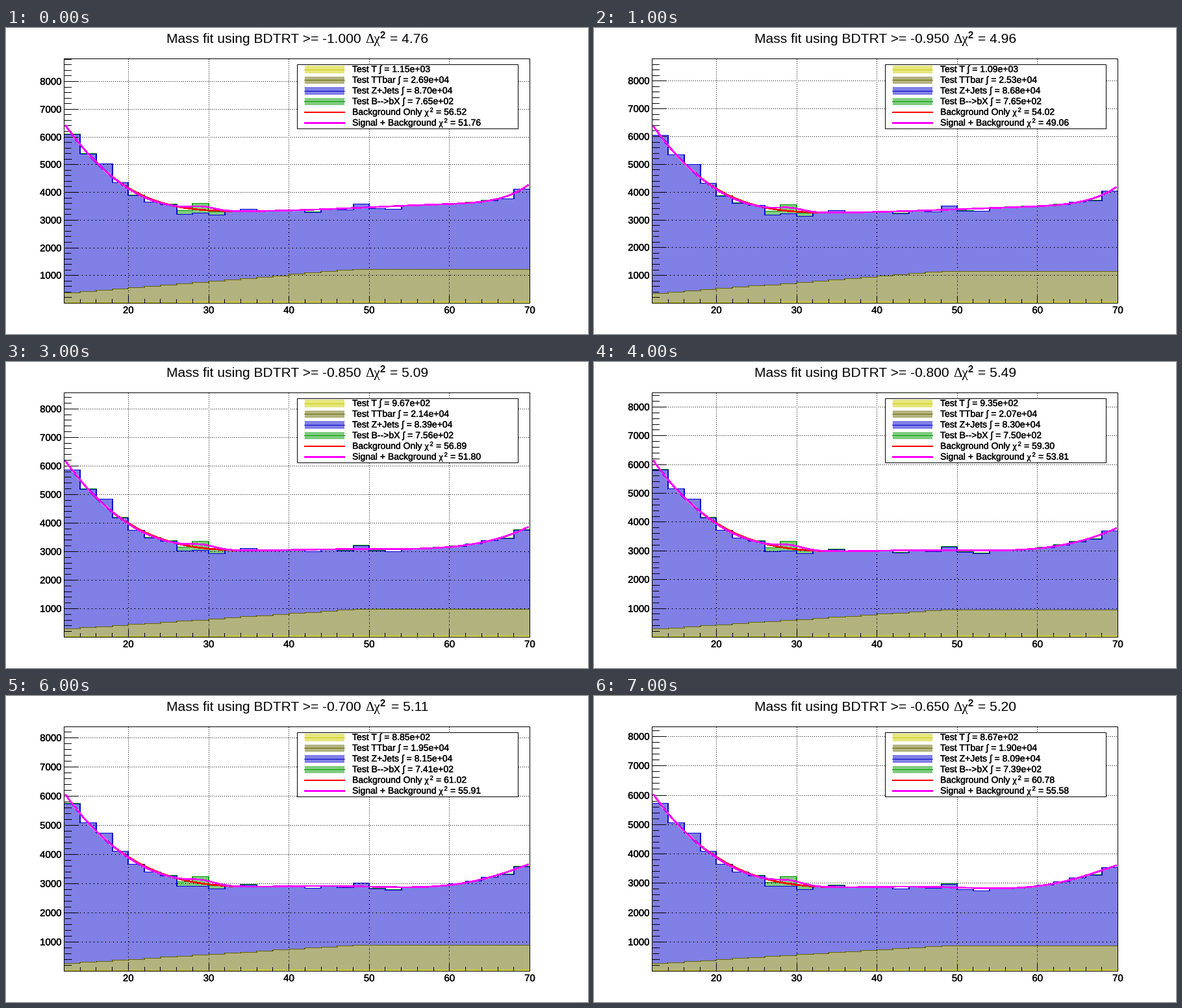
Recreate the animation shown at these times as a matplotlib script. Size 896x472 px, loop 8000 ms.

```python
import numpy as np
import matplotlib.pyplot as plt
from matplotlib.animation import FuncAnimation
from matplotlib.patches import Rectangle
from matplotlib.patheffects import withStroke

W, H, DPI = 896, 472, 64
LEFT, RIGHT, TOP, BOTTOM = 89.5, 806.5, 47.5, 424.5
PX = 72 / DPI  # points per pixel

plt.rcParams["font.family"] = ["Liberation Sans", "DejaVu Sans"]
plt.rcParams["path.snap"] = False

T_COLOR, TT_COLOR = (204, 204, 0), (102, 102, 0)
Z_COLOR, B_COLOR = (0, 0, 204), (0, 153, 0)

# Printed readings per cut: T, TTbar, Z+Jets, signal, chi2 of both fits
STEPS = [
    (1150, 26900, 87000, 765, 56.52, 51.76),
    (1090, 25300, 86800, 765, 54.02, 49.06),
    (1030, 23500, 85400, 763, 55.08, 48.89),
    (967, 21400, 83900, 756, 56.89, 51.80),
    (935, 20700, 83000, 750, 59.30, 53.81),
    (904, 20100, 82200, 744, 61.35, 55.35),
    (885, 19500, 81500, 741, 61.02, 55.91),
    (867, 19000, 80900, 739, 60.78, 55.58),
]

# Key points of the background fit at the loosest and the tightest cut
FIT_X = [12.2, 15, 19, 24, 30, 38, 50, 62, 69.75]
FIT_LOOSE = [6400, 5390, 4345, 3640, 3350, 3335, 3460, 3610, 4257]
FIT_TIGHT = [6011, 5065, 4070, 3350, 2940, 2868, 2851, 2985, 3602]

# Bins that stray visibly from the fit
STRAYS = {17: 220, 21: -100, 23: -95, 27: -235, 29: -110, 31: -150, 35: 70,
          43: -90, 47: -60, 49: 130, 51: -70, 53: -110, 67: -85}

EDGES = np.arange(12, 71, 2)
CENTRES = EDGES[:-1] + 1
STRAY = np.array([STRAYS.get(c, 0) for c in CENTRES])
MASS = np.linspace(12.2, 69.75, 101)

YY, XX = np.mgrid[:H, :W]
BIN = np.clip(((XX[0] + 0.5 - LEFT) * 29 / (RIGHT - LEFT)).astype(int), 0, 28)
INSIDE = (XX > LEFT) & (XX < RIGHT) & (YY < BOTTOM)
EVEN = (XX + YY) % 2 == 0


def x_px(mass):
    return LEFT + (np.asarray(mass) - 12) * (RIGHT - LEFT) / 58


def pixel_centre(v):
    return np.floor(v) + 0.5


def bump(x, centre, width):
    return np.exp(-((x - centre) / width) ** 2)


def scaled(x):
    return (np.asarray(x) - 41) / 29


def progress(i):
    """How far the background has shrunk, from 0 to 1."""
    totals = [sum(step[:3]) for step in STEPS]
    return (totals[0] - totals[i]) / (totals[0] - totals[-1])


def blank():
    return np.full((H, W, 3), 255, np.uint8)


def fill(img, region, color, pattern=EVEN):
    img[region] = 255
    img[region & pattern] = color


def stairs(heights):
    """Outline of a histogram in pixels, closed down to the axis."""
    y = np.repeat(pixel_centre(heights), 2)
    return np.repeat(x_px(EDGES), 2), np.concatenate([[BOTTOM], y, [BOTTOM]])


fig = plt.figure(figsize=(W / DPI, H / DPI), dpi=DPI, facecolor="white")
ax = fig.add_axes([0, 0, 1, 1])
ax.axis("off")


def show(img, z):
    return ax.imshow(img, extent=(0, W, H, 0), interpolation="nearest",
                     aspect="auto", zorder=z)


def line(color, width=1, z=3, x=(), y=()):
    if not isinstance(color, str):
        color = np.array(color) / 255
    return ax.plot(x, y, color=color, lw=width * PX, zorder=z,
                   antialiased=False)[0]


def segments(z, **style):
    return ax.vlines([], 0, 1, colors="black", lw=PX, zorder=z, **style)


def text(x, y, s, size, ha="left", **style):
    heavy = [withStroke(linewidth=0.35 * PX, foreground="black")]
    return ax.text(x, y, s, fontsize=size * PX, ha=ha, va="baseline", zorder=9,
                   path_effects=heavy if size < 16 else None, **style)


def symbol(x, y, s, size):
    text(x, y, s, size, family="Liberation Serif")


def box(x0, y0, x1, y1, z, face="none"):
    ax.add_patch(Rectangle((x0, y0), x1 - x0, y1 - y0, fc=face, ec="black",
                           lw=PX, zorder=z))


picture = show(blank(), 1)
grid = segments(2, linestyles=(0, (1, 2)))
ticks = segments(5)
signal_line = line(B_COLOR)
back_line = line(Z_COLOR, z=4)
ttbar_line = line(TT_COLOR, z=4)
t_line = line(T_COLOR, z=4)
red_fit = line("red", 1.7, 6)
magenta_fit = line("magenta", 1.7, 6.5)
box(LEFT, TOP, RIGHT, BOTTOM, 6)

# Legend
box(448.5, 56.5, 788.5, 155.5, 7, "white")
rows = [63.5 + 16.5 * k for k in range(6)]
names = ("Test T", "Test TTbar", "Test Z+Jets", "Test B-->bX")
swatches = np.zeros((H, W, 4), np.uint8)
entries = []
for row, color in zip(rows, (T_COLOR, TT_COLOR, Z_COLOR, B_COLOR)):
    area = (XX >= 460) & (XX < 521) & (abs(YY - row) <= 5.5)
    pattern = ~EVEN if color == Z_COLOR else EVEN
    fill(swatches, area, (*color, 255), pattern)
    line(color, 1, 8.5, (460, 521), (pixel_centre(row + 0.5),) * 2)
    entries.append(text(533, row + 4.5, "", 14))
show(swatches, 8)

chi_values = []
for row, color, label, x in ((rows[4], "red", "Background Only", 644.5),
                             (rows[5], "magenta", "Signal + Background", 666.5)):
    line(color, 2, 8.5, (460, 521), (row + 0.5,) * 2)
    text(533, row + 4.5, label, 14)
    symbol(x, row + 4.5, "χ", 14)
    text(x + 8, row, "2", 9.5)
    chi_values.append(text(x + 17.5, row + 4.5, "", 14))

title = text(247, 23, "", 21)
symbol(553, 23, "Δχ", 21)
text(576, 15.5, "2", 14.5)
title_value = text(650, 23, "", 21, "right")

for m in range(20, 71, 10):
    text(x_px(m), 440, str(m), 15, "center")
y_labels = [text(86, 0, str(1000 * k), 15, "right") for k in range(1, 9)]

ax.set_xlim(0, W)
ax.set_ylim(H, 0)


def draw_axes(y_px, y_max):
    majors = pixel_centre(y_px(np.arange(1000, 8001, 1000)))
    verticals = pixel_centre(x_px(np.arange(20, 61, 10)))
    grid.set_segments([[(LEFT + 0.5, y), (RIGHT, y)] for y in majors]
                      + [[(x, TOP + 0.5), (x, BOTTOM)] for x in verticals])
    marks = []
    for v in range(200, int(y_max) + 1, 200):
        y = pixel_centre(y_px(v))
        marks.append([(LEFT, y), (LEFT + (11.5 if v % 1000 else 22.5), y)])
    for m in EDGES[1:-1]:
        x = pixel_centre(x_px(m))
        marks.append([(x, BOTTOM), (x, BOTTOM - (6.5 if m % 10 else 11.5))])
    ticks.set_segments(marks)
    for label, y in zip(y_labels, majors):
        label.set_y(y + 5)


def update(i):
    t, tt, z, sig, chi_b, chi_s = STEPS[i]
    scale = 42.75 + 2.5 * (87000 - z) / 6100  # pixels per 1000 entries

    def y_px(v):
        return BOTTOM - np.asarray(v) * scale / 1000

    draw_axes(y_px, (BOTTOM - TOP) / scale * 1000)

    # Fits
    p = progress(i)
    points = (1 - p) * np.array(FIT_LOOSE) + p * np.array(FIT_TIGHT)
    poly = np.polyfit(scaled(FIT_X), points, 7)
    fit = np.polyval(poly, scaled(MASS))
    both = fit + 125 * bump(MASS, 29.2, 2.2) - 35 * bump(MASS, 22, 3)
    red_fit.set_data(x_px(MASS), y_px(fit))
    magenta_fit.set_data(x_px(MASS), y_px(both))

    # Stacked histograms
    back = np.polyval(poly, scaled(CENTRES)) + STRAY * (1 - 0.15 * p)
    signal = back + sig / 765 * (330 * bump(CENTRES, 28.9, 2) + 12)
    ttbar = np.minimum(370 + 24 * (CENTRES - 13), 1225) * (t + tt) / 28050
    top = np.minimum(20 + 1.1 * (CENTRES - 13), 50) * t / 1150
    img = blank()
    for values, outline, color, pattern in (
            (signal, signal_line, B_COLOR, EVEN), (back, back_line, Z_COLOR, ~EVEN),
            (ttbar, ttbar_line, TT_COLOR, EVEN), (top, t_line, T_COLOR, EVEN)):
        y = y_px(values)
        fill(img, INSIDE & (YY >= y[BIN]), color, pattern)
        outline.set_data(*stairs(y))
    picture.set_data(img)

    # Readings
    for entry, name, value in zip(entries, names, (t, tt, z, sig)):
        entry.set_text(f"{name} ∫ = {value:.2e}")
    for label, chi in zip(chi_values, (chi_b, chi_s)):
        label.set_text(f"= {chi:.2f}")
    title.set_text(f"Mass fit using BDTRT >= {-1 + 0.05 * i:.3f}")
    title_value.set_text(f"= {chi_b - chi_s:.2f}")
    return []


anim = FuncAnimation(fig, update, frames=len(STEPS), init_func=lambda: [],
                     interval=1000, repeat=True, repeat_delay=0, blit=False)
plt.show()
```
